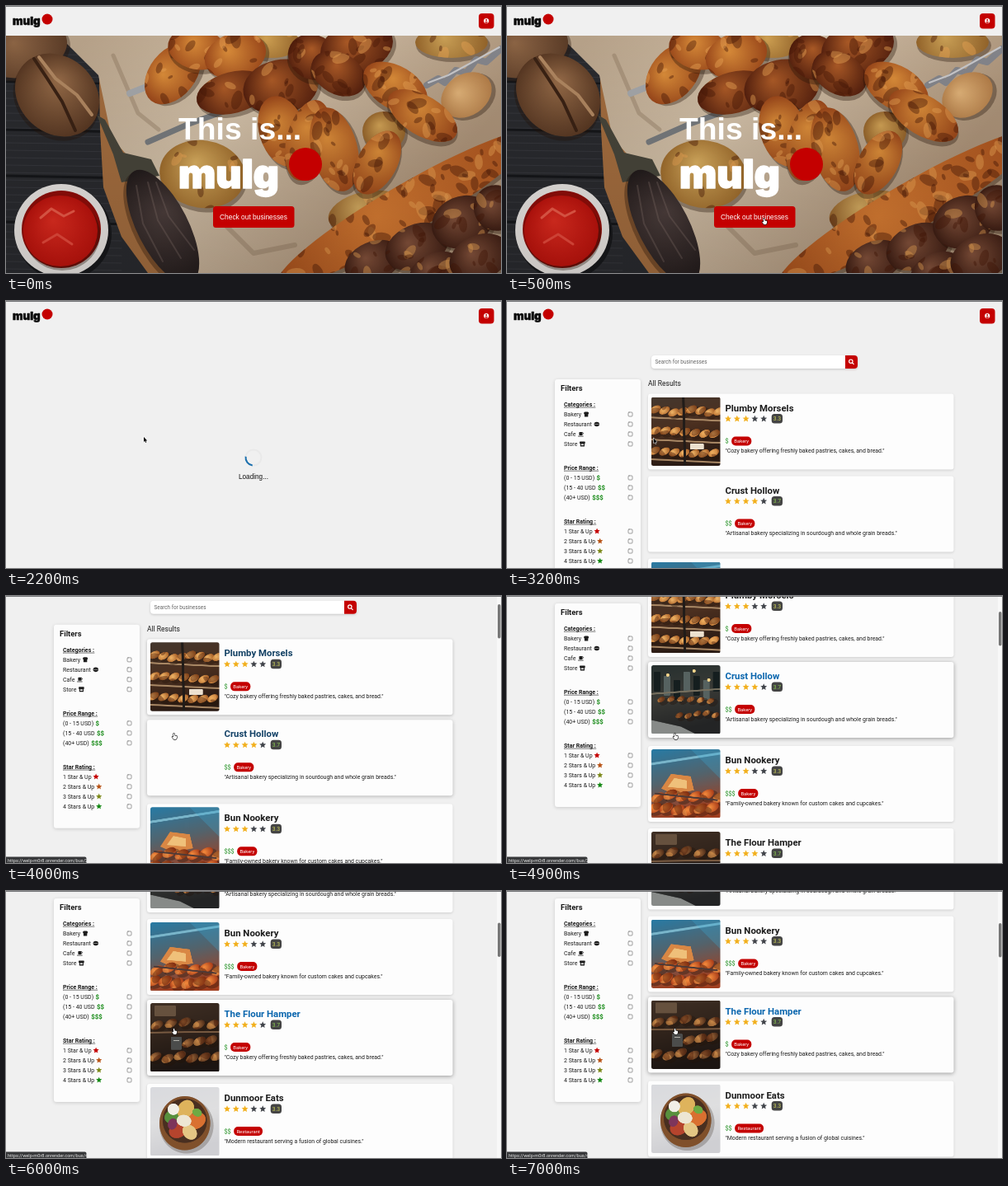
Recreate the animation shown at these times as an HTML page with a canvas. Size 600 px wide and 324 px high, loop 7.1 s.

```html
<!DOCTYPE html>
<html lang="en">
<head>
<meta charset="utf-8">
<title>Business finder</title>
<style>
html, body { margin: 0; width: 100%; height: 100%; overflow: hidden; background: #f0f0f0; }
canvas { display: block; width: 600px; height: 324px; }
</style>
</head>
<body>
<canvas id="stage" width="600" height="324"></canvas>
<script>
const LOOP = 7100, W = 600, H = 324, TAU = Math.PI * 2;
const RED = '#c40000', GREEN = '#178a17', INK = '#1c1c1c', PAGE = '#f0f0f0';
const UI = 'Roboto, sans-serif', ARIAL = '"Liberation Sans", sans-serif';
let g = document.getElementById('stage').getContext('2d');
const screen = g;

// ---- helpers ----
const clamp = v => Math.max(0, Math.min(1, v));
const ease = v => { v = clamp(v); return v * v * (3 - 2 * v); };
const mix = (a, b, k) => a + (b - a) * k;

function track(points, t) {
  if (t <= points[0][0]) return points[0].slice(1);
  for (let i = 1; i < points.length; i++) {
    const a = points[i - 1], b = points[i];
    if (t <= b[0]) return a.slice(1).map((v, j) => mix(v, b[j + 1], (t - a[0]) / (b[0] - a[0])));
  }
  return points[points.length - 1].slice(1);
}
function random(seed) {
  return () => (seed = (seed * 16807) % 2147483647) / 2147483647;
}
function rect(x, y, w, h, r, color) {
  g.fillStyle = color;
  g.beginPath();
  g.roundRect(x, y, w, h, r);
  g.fill();
}
function oval(x, y, rx, ry, rot, color) {
  g.fillStyle = color;
  g.beginPath();
  g.ellipse(x, y, rx, ry, rot, 0, TAU);
  g.fill();
}
function poly(points, color) {
  g.fillStyle = color;
  g.beginPath();
  points.forEach(p => g.lineTo(...p));
  g.closePath();
  g.fill();
}
function line(points, color, width) {
  g.strokeStyle = color;
  g.lineWidth = width;
  g.lineCap = g.lineJoin = 'round';
  g.beginPath();
  points.forEach(p => g.lineTo(...p));
  g.stroke();
}
function text(s, x, y, font, color, align = 'left') {
  g.font = font;
  g.fillStyle = color;
  g.textAlign = align;
  g.fillText(s, x, y);
  return g.measureText(s).width;
}
function shadow(color, blur, dy) {
  g.shadowColor = color;
  g.shadowBlur = blur;
  g.shadowOffsetY = dy;
}
function star(x, y, r, color) {
  const pts = [];
  for (let i = 0; i < 10; i++) {
    const a = i * TAU / 10 - TAU / 4, d = i % 2 ? r * 0.46 : r;
    pts.push([x + d * Math.cos(a), y + d * Math.sin(a)]);
  }
  poly(pts, color);
}
function offscreen(w, h, scale, draw) {
  const c = document.createElement('canvas');
  c.width = w * scale;
  c.height = h * scale;
  g = c.getContext('2d');
  g.scale(scale, scale);
  draw();
  g = screen;
  return c;
}

// ---- food scenery ----
function food(x, y, rx, ry, rot, light, dark, char = 0) {
  const rnd = random(Math.round(x * 91 + y * 7 + 5));
  g.save();
  g.translate(x, y);
  g.rotate(rot);
  oval(2, 4, rx + 1, ry + 1, 0, 'rgba(35,18,8,.35)');
  const shade = g.createRadialGradient(-rx * .2, -ry * .3, 1, 0, 0, Math.max(rx, ry));
  shade.addColorStop(0, light);
  shade.addColorStop(1, dark);
  oval(0, 0, rx, ry, 0, shade);
  g.clip();
  for (let i = 0; i < char; i++) {
    const px = (rnd() * 2 - 1) * rx, py = (rnd() * 2 - 1) * ry, s = 2 + rnd() * 6;
    oval(px, py, s * 1.5, s * .8, rnd() * 3, i % 3 ? 'rgba(70,22,6,.42)' : 'rgba(235,165,85,.45)');
  }
  g.restore();
}

function paintHero() {
  g.fillStyle = '#292a2e';
  g.fillRect(0, 0, W, H);
  [92, 150, 206, 262].forEach(y => line([[0, y], [150, y + 3]], '#151619', 3));
  for (let y = 40; y < H; y += 9) line([[0, y], [140, y + 2]], 'rgba(110,112,120,.18)', 1);
  poly([[112, 30], [114, 150], [118, 220], [140, 280], [172, 324], [600, 324], [600, 30]], '#a26c3e');
  const paper = g.createLinearGradient(100, 36, 420, 324);
  paper.addColorStop(0, '#b9a48b');
  paper.addColorStop(.45, '#d2c0a8');
  paper.addColorStop(1, '#ab9278');
  poly([[58, 30], [112, 84], [128, 160], [160, 196], [178, 250], [212, 324], [600, 324], [600, 30]], paper);
  line([[130, 60], [160, 130], [185, 150]], 'rgba(120,98,75,.3)', 5);
  line([[260, 260], [300, 300], [350, 290]], 'rgba(120,98,75,.3)', 6);

  food(22, 52, 53, 34, -.25, '#8d6545', '#5b3c27');
  food(62, 108, 55, 46, .75, '#966b48', '#573722');
  line([[34, 64], [50, 88], [68, 116], [84, 151]], '#3a2214', 4);
  line([[40, 62], [60, 88], [86, 108], [104, 132]], '#b08761', 4);

  oval(70, 276, 58, 57, 0, '#17181b');
  oval(67, 272, 57, 56, 0, '#e6e2df');
  oval(67, 271, 48, 47, 0, '#8e0d09');
  food(66, 273, 45, 43, 0, '#de2c20', '#ba120c');
  line([[42, 257], [55, 246], [70, 255], [82, 249]], '#e95a48', 3);
  line([[45, 287], [62, 277], [80, 289]], '#e4493b', 3);

  food(238, 204, 52, 41, .15, '#d8ad5f', '#9d6b2c', 10);
  food(322, 45, 35, 18, 0, '#cfa052', '#94642a', 5);
  food(540, 44, 44, 19, 0, '#cba056', '#94642a', 6);
  food(438, 250, 48, 25, -.2, '#d0a75e', '#94622b', 8);
  food(458, 152, 26, 24, 0, '#cfa054', '#95642b', 5);

  poly([[110, 132], [120, 138], [142, 178], [176, 186], [186, 206], [140, 214], [130, 180]], '#47453a');
  food(190, 268, 76, 31, 1.1, '#4b3d3b', '#211a1a');
  [[158, 218, 190, 310], [172, 214, 212, 306], [182, 214, 228, 296]].forEach(([a, b, c, d]) =>
    line([[a, b], [(a + c) / 2 - 8, (b + d) / 2], [c, d]], 'rgba(140,120,112,.3)', 2));

  line([[150, 106], [178, 95]], '#a5a7aa', 8);
  line([[172, 165], [222, 143], [305, 113]], '#777a7d', 7);
  line([[510, 96], [524, 88], [532, 93], [545, 78], [558, 81], [570, 65], [582, 68], [600, 52]], '#85868c', 8);
  line([[512, 93], [536, 84], [560, 71], [598, 50]], '#c9c9cc', 2);
  food(558, 108, 33, 25, -.6, '#dfb177', '#b47e49');

  const tan = ['#da8c39', '#9b471a'], brown = ['#aa5926', '#55200e'], meat = ['#81503a', '#3d1d13'];
  const pieces = [
    [202, 82, 42, 28, -.9, tan, 14], [232, 52, 36, 25, .2, tan, 10], [278, 60, 38, 27, -.3, tan, 12],
    [275, 105, 45, 25, -.25, brown, 12], [333, 98, 46, 33, -.2, brown, 16],
    [372, 62, 31, 27, .5, brown, 12], [425, 50, 45, 31, -.3, brown, 16], [403, 82, 35, 25, .5, brown, 12],
    [335, 152, 28, 44, -.3, tan, 12], [366, 163, 26, 50, .25, tan, 14], [398, 174, 28, 52, -.25, tan, 18],
    [450, 190, 24, 42, .5, tan, 12], [472, 99, 43, 26, .55, tan, 16], [505, 133, 47, 24, .55, tan, 16]
  ];
  pieces.forEach(([x, y, rx, ry, rot, c, n]) => food(x, y, rx, ry, rot, c[0], c[1], n));

  food(485, 246, 180, 29, -.53, '#d47a32', '#a44e1c', 75);
  [[445, 310, 36, 24], [498, 292, 40, 27], [553, 262, 38, 31], [594, 245, 27, 28],
   [520, 320, 32, 20], [574, 305, 38, 27]].forEach(([x, y, a, b]) => food(x, y, a, b, -.4, ...meat, 10));
  const dim = g.createLinearGradient(0, 36, 0, H);
  dim.addColorStop(0, 'rgba(0,0,0,.02)');
  dim.addColorStop(1, 'rgba(0,0,0,.12)');
  g.fillStyle = dim;
  g.fillRect(0, 0, W, H);
}

function backdrop(...colors) {
  const grad = g.createLinearGradient(0, 0, 20, 84);
  colors.forEach((c, i) => grad.addColorStop(i / (colors.length - 1), c));
  g.fillStyle = grad;
  g.fillRect(0, 0, 84, 84);
}
function loaves(rows, light, dark, size) {
  rows.forEach(([y, x0, x1, step]) => {
    for (let x = x0; x < x1; x += step) food(x, y + Math.sin(x) * 2, size, size * .6, -.5, light, dark, 2);
  });
}
const paintPhoto = [
  () => {
    backdrop('#44372e', '#4c3020', '#2a1b14');
    [25, 52, 76].forEach(y => line([[0, y], [84, y + 4]], '#a98865', 2));
    loaves([[17, 5, 84, 11], [43, 5, 84, 12], [67, 4, 84, 12]], '#e9ae62', '#a55c24', 7);
    line([[39, 0], [41, 84]], '#211c19', 3);
    rect(47, 57, 17, 7, 1, '#ece1cf');
  },
  () => {
    backdrop('#26302f', '#393a36', '#232425');
    for (let i = 0; i < 7; i++) rect(3 + i * 12, 8 + i % 3 * 5, 8, 24, 1, i % 2 ? '#566260' : '#151e1f');
    line([[0, 35], [84, 29]], '#77705f', 2);
    loaves([[43, 12, 80, 12], [60, 34, 84, 11]], '#b8783f', '#57331d', 5);
    poly([[0, 67], [36, 75], [54, 84], [0, 84]], '#878a88');
    [[20, 12], [52, 7], [70, 18]].forEach(([x, y]) => oval(x, y, 2, 2, 0, '#f4d48b'));
  },
  () => {
    backdrop('#287ba5', '#53636c', '#a13f20');
    line([[0, 18], [84, 5]], '#79b5ca', 3);
    poly([[12, 48], [24, 30], [48, 33], [52, 50], [28, 55]], '#d98744');
    poly([[20, 46], [28, 35], [43, 38], [43, 48]], '#efc07a');
    loaves([[57, 8, 84, 15], [73, 4, 84, 14]], '#ee853a', '#a83b18', 9);
    line([[5, 54], [80, 62]], '#4f3a36', 2);
    poly([[48, 0], [84, 0], [84, 36]], 'rgba(60,165,210,.3)');
  },
  () => {
    backdrop('#403025', '#30231b', '#1c1512');
    rect(5, 3, 26, 13, 1, '#66513e');
    loaves([[25, 8, 84, 17], [47, 46, 84, 14], [66, 6, 84, 15]], '#9e6739', '#4c2b18', 8);
    line([[0, 36], [84, 35]], '#785a41', 2);
    rect(25, 41, 13, 16, 1, '#4b4c4b');
    rect(28, 45, 7, 1, 0, '#b3b1aa');
  },
  () => {
    backdrop('#d9dade', '#dfdfe0', '#cfcfd3');
    oval(44, 47, 33, 34, 0, 'rgba(70,60,55,.3)');
    oval(42, 44, 31, 33, 0, '#80502b');
    oval(42, 41, 27, 27, 0, '#492f20');
    [[28, 36, 11, '#58903d'], [43, 27, 12, '#deb35c'], [56, 41, 12, '#d97030'], [34, 52, 12, '#b6442d'],
     [48, 55, 10, '#e4c684'], [27, 45, 7, '#7d355b'], [41, 41, 9, '#ede6d4'], [57, 31, 6, '#6eaa43']]
      .forEach(([x, y, r, c]) => oval(x, y, r, r * .8, x, c));
    oval(28, 27, 7, 7, 0, '#f2efe7');
  }
];

const hero = offscreen(W, H, 1, paintHero);
const photos = paintPhoto.map(p => offscreen(84, 84, 2, p));

// ---- page content ----
const COZY = '"Cozy bakery offering freshly baked pastries, cakes, and bread."';
const cards = [
  ['Plumby Morsels', 3.3, '$', 'Bakery', COZY, 2700],
  ['Crust Hollow', 3.7, '$$', 'Bakery', '"Artisanal bakery specializing in sourdough and whole grain breads."', 4400],
  ['Bun Nookery', 3.3, '$$$', 'Bakery', '"Family-owned bakery known for custom cakes and cupcakes."', 2900],
  ['The Flour Hamper', 3.7, '$', 'Bakery', COZY, 3000],
  ['Dunmoor Eats', 3.3, '$$', 'Restaurant', '"Modern restaurant serving a fusion of global cuisines."', 3000]
];
const HERO_END = 1000, RESULTS = 2500;
const scrollPath = [[3500, 0], [4000, 60], [4500, 128], [4900, 130.5], [5200, 135], [5900, 277], [6000, 278.5], [6500, 282]];
const cursorPath = [[100, 312, 330], [500, 312, 261], [900, 312, 261], [1500, 167, 165], [3100, 167, 165], [3450, 204, 170]];
const hovers = [[3400, 0], [3860, 1], [5230, 2], [5720, 3], [LOOP, -1]];

function wordmark(x, y, size, color) {
  g.strokeStyle = color;
  g.lineWidth = size * .035;
  g.lineJoin = 'round';
  text('mulg', x, y, `900 ${size}px Inter, sans-serif`, color);
  g.strokeText('mulg', x, y);
}
function header(y) {
  g.fillStyle = PAGE;
  g.fillRect(0, y, W, 36);
  wordmark(8, y + 22.5, 13.3, '#080808');
  oval(50, y + 16, 6.5, 6.5, 0, RED);
  rect(573, y + 9, 18.5, 18.5, 4, RED);
  oval(582.2, y + 18, 3.1, 3.1, 0, '#fff');
  oval(582.2, y + 17.1, 1, 1, 0, RED);
  oval(582.2, y + 19.7, 1.7, .9, 0, RED);
}
function heroPage() {
  g.drawImage(hero, 0, 0);
  header(0);
  text('This is...', 209, 162, `bold 37.3px ${ARIAL}`, '#fff');
  wordmark(209, 221, 48, '#fff');
  oval(363, 192, 20, 20, 0, RED);
  rect(251, 243, 98.5, 26, 3.5, RED);
  text('Check out businesses', 300, 259, `8.4px ${ARIAL}`, '#fff', 'center');
}
function loadingPage(t) {
  header(0);
  g.lineWidth = 2;
  g.lineCap = 'butt';
  g.strokeStyle = '#e9e9e9';
  g.beginPath();
  g.arc(300, 190, 9.5, 0, TAU);
  g.stroke();
  const a = ((t - 2200) / 1000 + .27) * TAU;
  g.strokeStyle = '#1b70ae';
  g.beginPath();
  g.arc(300, 190, 9.5, a, a + TAU / 4);
  g.stroke();
  text('Loading...', 300, 215.5, `8.2px ${ARIAL}`, '#111', 'center');
}

const icons = [
  (x, y) => { rect(x - 3, y - 3, 6, 3, 1.5, INK); rect(x - 2.2, y - 1, 4.4, 4, .5, INK); },
  (x, y) => { oval(x, y, 3.2, 2.8, 0, INK); line([[x - 2.5, y], [x + 2.5, y]], '#ddd', .5); },
  (x, y) => {
    rect(x - 2, y - 2.5, 4, 4, .7, INK);
    line([[x + 2, y - 2], [x + 3.3, y - 1], [x + 2, y + .5]], INK, .8);
    line([[x - 3, y + 2.6], [x + 2.8, y + 2.6]], INK, .8);
  },
  (x, y) => { rect(x - 3.3, y - 3, 6.6, 2.6, .6, INK); rect(x - 2.6, y - 1, 5.2, 4, .3, INK); rect(x - 1.5, y, 3, 1.6, 0, '#fff'); }
];
function panel(top) {
  shadow('rgba(0,0,0,.16)', 4, 1);
  rect(58, top, 104, 247, 3, '#fcfcfc');
  shadow('transparent', 0, 0);
  text('Filters', 65, top + 14.3, `bold 9.4px ${UI}`, INK);
  const group = (title, y, labels, mark) => {
    const w = text(title, 69, top + y + 2.5, `bold 7px ${UI}`, INK);
    line([[69, top + y + 3.7], [69 + w, top + y + 3.7]], INK, .6);
    labels.forEach((label, i) => {
      const cy = top + y + 12 + i * 12;
      const lw = text(label, 69, cy + 2.4, `7px ${UI}`, INK);
      mark(69 + lw, cy, i);
      g.strokeStyle = '#777';
      g.lineWidth = .7;
      g.beginPath();
      g.roundRect(147, cy - 2.5, 5, 5, 1);
      g.stroke();
    });
  };
  group('Categories :', 30.5, ['Bakery', 'Restaurant', 'Cafe', 'Store'], (x, y, i) => icons[i](x + 6, y));
  group('Price Range :', 107.5, ['(0 - 15 USD)', '(15 - 40 USD', '(40+ USD)'],
    (x, y, i) => text('$'.repeat(i + 1), x + 2.5, y + 2.7, `bold 7.8px ${UI}`, GREEN));
  group('Star Rating :', 172.5, ['1 Star & Up', '2 Stars & Up', '3 Stars & Up', '4 Stars & Up'],
    (x, y, i) => star(x + 5.5, y, 3.8, ['#c40000', '#b85418', '#7d8a1c', GREEN][i]));
}
function hoverAmount(i, t, duration) {
  const k = hovers.findIndex(h => h[1] === i);
  if (k < 0) return 0;
  return ease((t - hovers[k][0]) / duration) - ease((t - hovers[k + 1][0]) / duration);
}
function card(i, t, scroll) {
  const [name, rating, price, kind, about, loadTime] = cards[i];
  const tint = hoverAmount(i, t, 280), y = 112.5 + 100 * i - scroll - 2 * hoverAmount(i, t, 120);
  if (y > H || y < -100) return;
  shadow(`rgba(0,0,0,${mix(.14, .36, tint)})`, mix(3, 5, tint), 1);
  rect(171, y, 370.5, 92, 3, '#fdfdfd');
  shadow('transparent', 0, 0);
  if (t >= loadTime) {
    g.save();
    g.beginPath();
    g.roundRect(175, y + 4, 83.5, 83.5, 2.5);
    g.clip();
    g.drawImage(photos[i], 175, y + 4, 83.5, 83.5);
    g.restore();
  }
  const c = [[28, 10], [28, 102], [28, 174]].map(([a, b]) => Math.round(mix(a, b, tint)));
  text(name, 264.5, y + 21, `bold 11.4px ${UI}`, `rgb(${c})`);
  for (let s = 0; s < 5; s++) star(268 + s * 10.8, y + 30.5, 4.2, s < Math.round(rating) ? '#f2b01e' : '#42454b');
  rect(320.7, y + 24.5, 13.3, 11.5, 3.5, '#444');
  text(rating.toFixed(1), 327.4, y + 32.7, `6.8px ${UI}`, rating > 3.5 ? '#8fd052' : '#d2d65c', 'center');
  const pw = text(price, 264.5, y + 59.7, `7.2px ${UI}`, GREEN);
  g.font = `5.9px ${UI}`;
  const kw = g.measureText(kind).width, px = 264.5 + pw + 3.6;
  rect(px, y + 52, kw + 6.4, 11, 5, RED);
  text(kind, px + 3.2, y + 59.6, `5.9px ${UI}`, '#fff');
  text(about, 264.5, y + 71.7, `6.93px ${UI}`, INK);
}
function resultsPage(t) {
  const scroll = track(scrollPath, t)[0];
  if (scroll < 36) header(-scroll);
  const sy = 66 - scroll;
  shadow('rgba(0,0,0,.18)', 3, 1);
  rect(175, sy, 250, 16, 4, '#fff');
  shadow('transparent', 0, 0);
  rect(410, sy, 15, 16, [0, 4, 4, 0], RED);
  g.strokeStyle = '#fff';
  g.lineWidth = 1.2;
  g.beginPath();
  g.arc(416.8, sy + 7.2, 2.2, 0, TAU);
  g.stroke();
  line([[418.5, sy + 9], [420.2, sy + 10.7]], '#fff', 1.2);
  text('Search for businesses', 179.5, sy + 10.4, `6.4px ${UI}`, '#666');
  text('All Results', 171, 103 - scroll, `8.5px ${UI}`, INK);
  panel(Math.max(9, 95 - scroll));
  cards.forEach((_, i) => card(i, t, scroll));

  if (t >= 3500) {
    g.fillStyle = '#f8f8f8';
    g.fillRect(595, 1, 5, H);
    rect(596, 2 + scroll * .131, 3.5, 41.5, 1.8, '#777');
  }
  const active = hovers.filter(h => h[0] <= t).pop();
  if (active) {
    rect(0, 316.5, 97.5, 8, [0, 2, 0, 0], '#37383a');
    text(`https://welp-m0r8.onrender.com/bus/${active[1] + 1}`, 2, 322.6, `5.6px ${UI}`, '#e6e6e6');
  }
}

function arrow(x, y) {
  const shape = [[x, y], [x, y + 6], [x + 1.4, y + 4.8], [x + 2.3, y + 7], [x + 3.2, y + 6.6], [x + 2.4, y + 4.5], [x + 4.2, y + 4.4]];
  line([...shape, shape[0]], '#fff', 1);
  poly(shape, '#000');
}
function hand(x, y) {
  const shape = [[x - 1, y - 3], [x, y - 3], [x + .4, y - .5], [x + 3, y], [x + 3, y + 2.3], [x + 2, y + 4],
    [x - .6, y + 4], [x - 2.7, y + 1], [x - 1, y + 1.1]];
  line([...shape, shape[0]], '#222', 1.3);
  poly(shape, '#fff');
}

function draw(now) {
  const t = now % LOOP;
  g.fillStyle = PAGE;
  g.fillRect(0, 0, W, H);
  if (t < HERO_END) heroPage();
  else if (t < RESULTS) loadingPage(t);
  else resultsPage(t);
  g.fillStyle = '#77787a';
  g.fillRect(0, 0, W, 1);
  const [x, y] = track(cursorPath, t);
  const onLink = t >= hovers[0][0] || (t >= 400 && t < HERO_END);
  (onLink ? hand : arrow)(x, y);
}

const start = performance.now();
function tick() {
  draw(performance.now() - start);
  requestAnimationFrame(tick);
}
tick();
</script>
</body>
</html>
```
